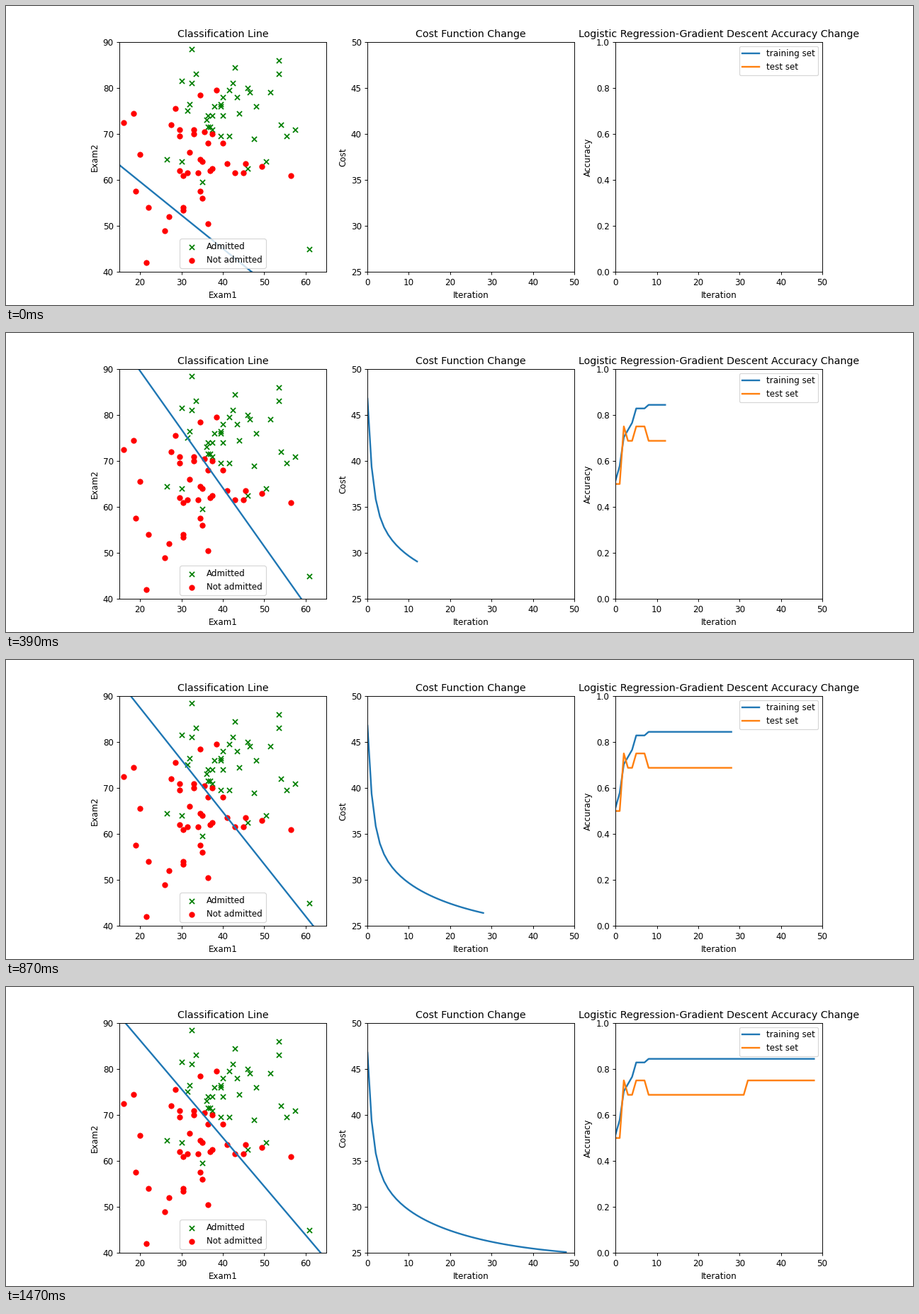
Animation of 1280x423 px, one loop 1500 ms. Source, as a matplotlib script:

```python
import matplotlib.pyplot as plt
import numpy as np
from matplotlib.animation import FuncAnimation

FRAMES = 50
STEP_MS = 30
CLASS_SIZE = 40

rng = np.random.default_rng(4)
steps = np.arange(FRAMES)


def exam_scores(edge, mean, spread):
    """Edge points of a class, filled up with a random cloud in half marks."""
    cloud = rng.normal(mean, spread, (CLASS_SIZE - len(edge), 2))
    return np.vstack([edge, np.round(cloud * 2) / 2])


def decay(k, tau):
    return np.exp(-k / tau)


def boundary(k, x):
    """Decision line after k steps: it settles fast, then turns slowly."""
    slope = 1.01 + 0.481 * decay(k, 21) - 0.7655 * decay(k, 1.3)
    height = 68.3 - 20.55 * decay(k, 2.35) - 0.45 * decay(k, 20)
    return height + slope * (37 - x)


admitted = exam_scores(
    [(61, 45), (57.5, 71), (55.5, 69.5), (53.5, 86), (53.5, 83),
     (26.5, 64.5), (30, 64), (35, 59.5)],
    mean=(41.5, 75), spread=(6, 6))
rejected = exam_scores(
    [(16, 72.5), (18.5, 74.5), (20, 65.5), (19, 57.5), (22, 54),
     (21.5, 42), (56.5, 61), (49.5, 63)],
    mean=(34.5, 62.5), spread=(5, 7))

cost = (24.3 + 8.16 * decay(steps, 20.8) + 4.1 * decay(steps, 4)
        + 10.2 * decay(steps, 1.1))

# Correct answers at the corners of each curve, out of 64 and 16 students
train_acc = np.interp(steps, [0, 1, 2, 4, 5, 7, 8],
                      [33, 37, 45, 49, 53, 53, 54]) / 64
test_acc = np.interp(steps, [1, 2, 3, 4, 5, 7, 8, 31, 32],
                     [8, 12, 11, 11, 12, 12, 11, 11, 12]) / 16

fig, (ax_line, ax_cost, ax_acc) = plt.subplots(
    1, 3, figsize=(15, 4.9571), dpi=1280 / 15)


def style(ax, title, xlabel, ylabel, xlim, ylim):
    ax.set(title=title, xlabel=xlabel, ylabel=ylabel, xlim=xlim, ylim=ylim)


ax_line.scatter(*admitted.T, c="green", marker="x", label="Admitted")
ax_line.scatter(*rejected.T, c="red", marker="o", label="Not admitted")
split, = ax_line.plot([], [], lw=2)
cost_curve, = ax_cost.plot([], [], lw=2)
train_curve, = ax_acc.plot([], [], lw=2, label="training set")
test_curve, = ax_acc.plot([], [], lw=2, label="test set")

style(ax_line, "Classification Line", "Exam1", "Exam2", (15, 65), (40, 90))
style(ax_cost, "Cost Function Change", "Iteration", "Cost", (0, 50), (25, 50))
style(ax_acc, "Logistic Regression-Gradient Descent Accuracy Change",
      "Iteration", "Accuracy", (0, 50), (0, 1))
ax_line.legend(loc="lower center")
ax_acc.legend(loc="upper right")

span = np.array([0, 100])
curves = ((cost_curve, cost), (train_curve, train_acc), (test_curve, test_acc))


def update(k):
    split.set_data(span, boundary(k, span))
    for curve, values in curves:
        curve.set_data(steps[:k], values[:k])
    return split, cost_curve, train_curve, test_curve


anim = FuncAnimation(fig, update, frames=FRAMES, interval=STEP_MS,
                     repeat=True, repeat_delay=0)
plt.show()
```
